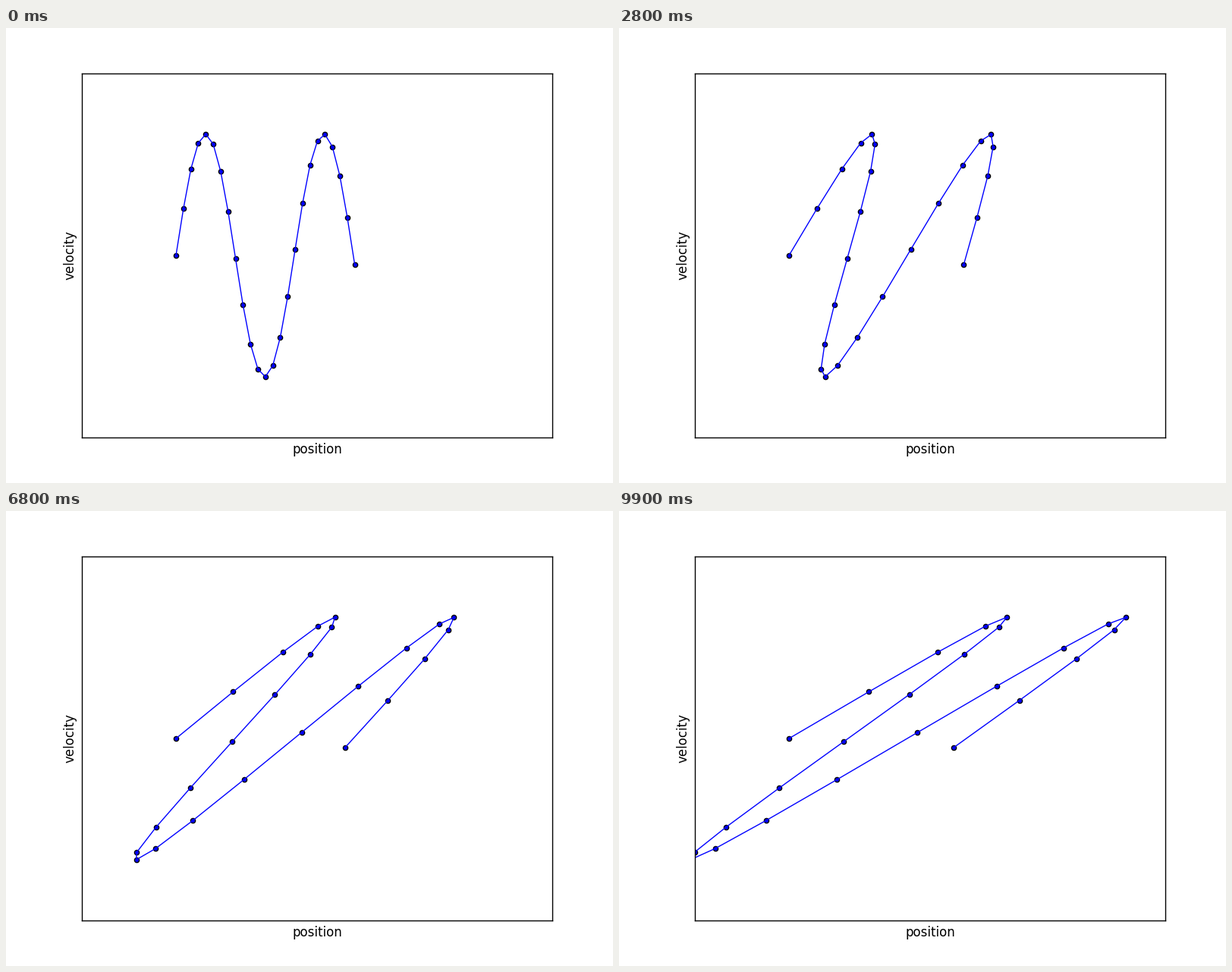
Animation, 800 px wide and 600 px high, one loop 10 s. Source, as a matplotlib script:

```python
import numpy as np
import matplotlib.pyplot as plt
from matplotlib.animation import FuncAnimation

FRAMES = 100
INTERVAL = 100  # ms

plt.rcParams.update({
    "font.family": "DejaVu Sans",
    "font.size": 12,
    "axes.linewidth": 1.0,
})

# Free particles: each keeps its velocity while its position drifts.
start = np.linspace(0, 9.5, 25)
velocity = np.sin(start)
times = np.linspace(0, 10, FRAMES)

fig = plt.figure(figsize=(8, 6), dpi=100, facecolor="white")
ax = fig.add_axes([0.125, 0.1, 0.775, 0.8])
ax.set(xlim=(-5, 20), ylim=(-1.5, 1.5), xticks=[], yticks=[])
ax.tick_params(length=0)
ax.set_xlabel("position", fontsize=12, labelpad=5)
ax.set_ylabel("velocity", fontsize=12, labelpad=5)

line, = ax.plot(start, velocity, color="blue", lw=1.0)
dots = ax.scatter(start, velocity, s=20, c="blue", edgecolors="black",
                  linewidths=1.0)


def update(i):
    position = start + velocity * times[i]
    line.set_data(position, velocity)
    dots.set_offsets(np.column_stack([position, velocity]))
    return line, dots


anim = FuncAnimation(fig, update, frames=FRAMES, interval=INTERVAL,
                     repeat=True, repeat_delay=0, blit=False)
plt.show()
```
